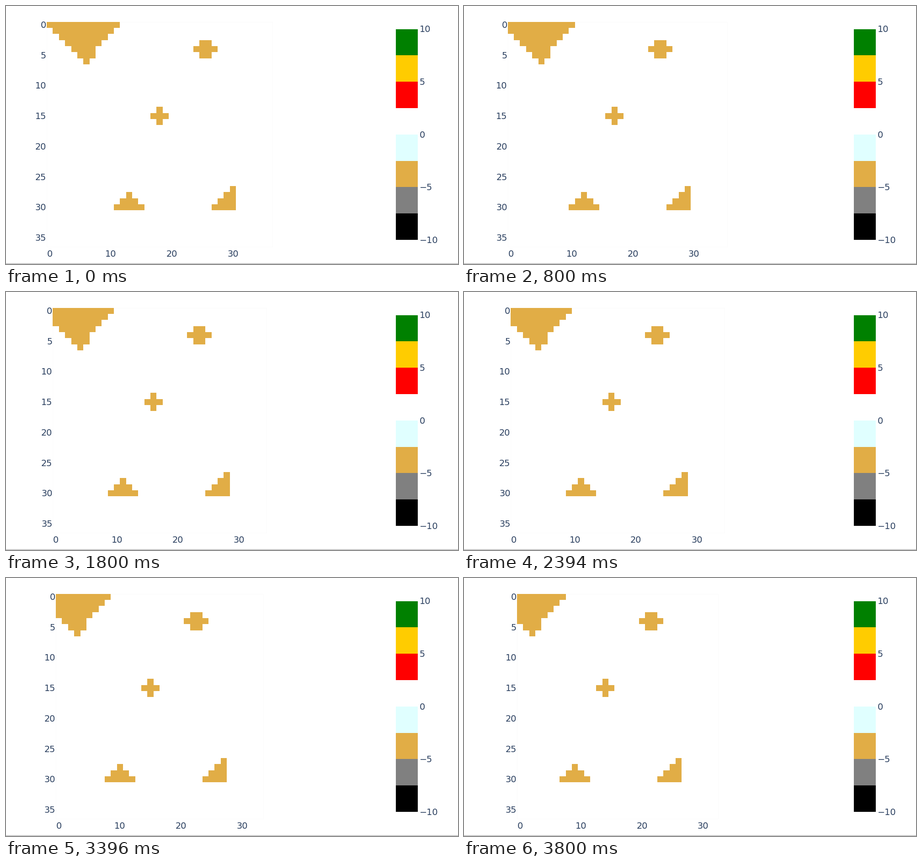
These frames come from a looping animation (989 px wide and 566 px high, 4600 ms). A matplotlib script:

```python
import numpy as np
import matplotlib.pyplot as plt
from matplotlib.animation import FuncAnimation
from matplotlib.patches import Rectangle

W, H, DPI = 989, 566, 64
LOOP, TICK = 4600, 20
STEP_TIMES = [800, 1800, 2790, 3800]

CELL, LEFT, TOP, SIZE = 13.35, 89.1, 34.5, 37
FONT = 19.2
DIGIT = 0.636 * FONT  # advance width of one digit
SAND, INK = "#e1ad46", "#2a3f5f"

# (row, first column, end column)
RUNS = (
    [(r, r, 12 - r) for r in range(5)] + [(5, 5, 8), (6, 6, 7)]
    + [(3, 25, 27), (4, 24, 28), (5, 25, 27)]
    + [(14, 18, 19), (15, 17, 20), (16, 18, 19)]
    + [(28 + k, 13 - k, 14 + k) for k in range(3)]
    + [(27 + k, 30 - k, 31) for k in range(4)]
)
BANDS = ["green", "#ffcc00", "red", "white", "#e0ffff", SAND, "gray", "black"]
BAR_X, BAR_W, BAR_TOP, BAR_END = 853, 48, 50.5, 513

fig = plt.figure(figsize=(W / DPI, H / DPI), dpi=DPI, facecolor="white")
ax = fig.add_axes([0, 0, 1, 1])
ax.set_xlim(0, W)
ax.set_ylim(H, 0)
ax.axis("off")


def box(x, y, w, h, color):
    return ax.add_patch(Rectangle((x, y), w, h, fc=color, lw=0))


def label(x, mid, value):
    return ax.text(x, mid + 6.8, str(value).replace("-", "\u2212"),
                   family="DejaVu Sans", size=FONT * 72 / DPI, color=INK,
                   ha="left", va="baseline")


def text_width(value):
    return DIGIT * len(str(value))


box(0, 564, W, 2, "#cccccc")
band_h = (BAR_END - BAR_TOP) / len(BANDS)
for k, color in enumerate(BANDS):
    box(BAR_X, BAR_TOP + k * band_h, BAR_W, band_h, color)
for value in (10, 5, 0, -5, -10):
    label(905, BAR_TOP + (10 - value) / 20 * (BAR_END - BAR_TOP), value)

frame = ax.add_patch(Rectangle((LEFT, TOP), SIZE * CELL, SIZE * CELL,
                               fill=False, ec="#fbfbfb", lw=72 / DPI))
bars = [box(0, TOP + row * CELL, 0, CELL, SAND) for row, _, _ in RUNS]
y_labels = [(v, label(0, TOP + (v + 0.5) * CELL, v)) for v in range(0, 36, 5)]
x_labels = [(v, label(0, 542.7, v)) for v in range(0, 31, 10)]


def update(i):
    # Each step drops the leftmost column and keeps the plot centred.
    step = int(np.searchsorted(STEP_TIMES, i * TICK + TICK / 2, side="right"))
    left = LEFT + step * CELL / 2
    frame.set_x(left)
    frame.set_width((SIZE - step) * CELL)
    for bar, (_, start, end) in zip(bars, RUNS):
        a, b = max(start - step, 0), max(end - step, 0)
        bar.set_x(left + a * CELL)
        bar.set_width((b - a) * CELL)
    for value, text in y_labels:
        text.set_x(left - 1 - text_width(value))
    for value, text in x_labels:
        text.set_x(left + (value + 0.5) * CELL - text_width(value) / 2)
    return [frame, *bars]


anim = FuncAnimation(fig, update, frames=LOOP // TICK, interval=TICK,
                     repeat=True, repeat_delay=0, blit=False)
plt.show()
```
